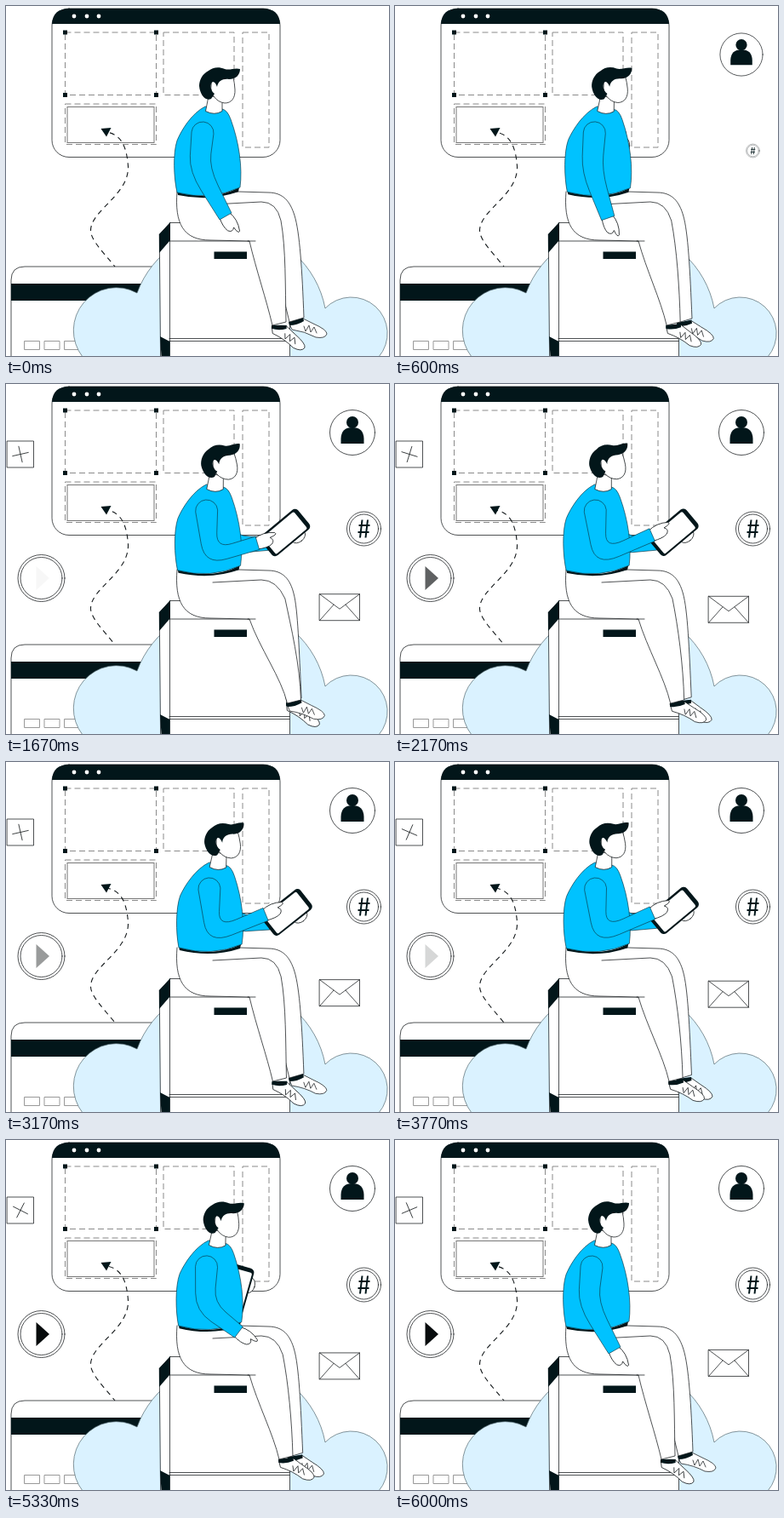
These frames come from a looping animation (450 by 411 pixels, 6030 ms). An HTML page:

```html
<!DOCTYPE html>
<html lang="en">
<head>
<meta charset="utf-8">
<title>Person with tablet</title>
<style>
  html, body { margin: 0; width: 100%; height: 100%; overflow: hidden; background: #fff; }
  svg { display: block; width: 100%; height: 100%; }
  .line { fill: #fff; stroke: #14191b; stroke-width: .75; stroke-linejoin: round; stroke-linecap: round; }
  .bare { fill: none; }
  .ink { fill: #02161a; }
  .blue { fill: #00c2ff; stroke: #0b3340; stroke-width: .65; stroke-linejoin: round; }
  .dash { fill: none; stroke: #8a8a8a; stroke-width: 1; stroke-dasharray: 7 4; }
</style>
</head>
<body>
<svg viewBox="0 0 450 411">
  <defs>
    <g id="shoe">
      <path class="line" d="M0 2L3 9Q18 11 31 18Q42 20 44 14Q44 9 28 2L16 -4Z"/>
      <path class="line bare" d="M17 5l2 6 4-7 2 8 4-6 3 7"/>
      <path class="ink" d="M-1 0L16 -5L17 -1Q9 4 0 4Z"/>
    </g>
  </defs>

  <g id="window">
    <rect class="line" x="54" y="3" width="268" height="174.5" rx="20"/>
    <path class="ink" d="M54 21Q55 3 74 3H302Q321 3 322 21Z"/>
    <g fill="#fff"><circle cx="80" cy="12" r="2.4"/><circle cx="95" cy="12" r="2.4"/><circle cx="109" cy="12" r="2.4"/></g>
    <rect class="dash" x="69.5" y="31" width="107" height="73.5"/>
    <rect class="dash" x="185" y="31" width="83" height="73.5"/>
    <rect class="dash" x="278" y="31" width="31" height="135"/>
    <rect class="dash" x="69.5" y="115" width="107" height="47.5"/>
    <rect x="72" y="118.5" width="102" height="42" fill="#fff" stroke="#777"/>
    <path class="ink" d="M67 28.500h5v5h-5zM174 28.500h5v5h-5zM67 102h5v5h-5zM174 102h5v5h-5z"/>
  </g>

  <g id="card">
    <path class="line" d="M6 415V322Q6 306 22 306H190V415Z"/>
    <path class="ink" d="M6 326H160V346H6Z"/>
    <path fill="none" stroke="#999" d="M21.500 393.500h18v10h-18zM45 393.500h18v10h-18zM68.500 393.500h18v10h-18z"/>
  </g>

  <path id="trail" fill="none" stroke="#14191b" stroke-width="1.100" stroke-dasharray="6 5"
    d="M118 148C138 151 142 170 143.500 188C145 222 99 240 99.500 264C100 275 114 289 128 306"/>
  <path class="ink" d="M111.500 144L123.500 143L118 153.500Z"/>

  <path d="M90 412A50.300 50.300 0 0 1 154 337A115 115 0 0 1 375 355A42.500 42.500 0 0 1 438 412Z"
    fill="#daf2ff" stroke="#53676f" stroke-width=".7"/>

  <g id="box">
    <path class="line" d="M180.500 268L193 254.500H333.500V415H182Z"/>
    <path class="line bare" d="M192 276H333.500M192.500 254.500V411M192 390.500H333M192 393.500H333"/>
    <path class="ink" d="M180 268L193 254V275L180 290ZM181 388L192.500 394V411H182.500Z"/>
    <path class="ink" d="M244.500 288.500H283V297H244.500Z"/>
  </g>

  <g id="user">
    <circle class="line" r="26.500"/>
    <circle class="ink" cy="-12" r="7"/>
    <path class="ink" d="M-13.500 13V7Q-13 -6 0 -6Q13 -6 13.500 7V13Z"/>
  </g>
  <g id="hash">
    <circle class="line" r="20"/><circle class="line" r="17"/>
    <path d="M-2 -10.500L-4.500 10.500M4.500 -10.500L2 10.500M-6 -4H7M-7 4H6" fill="none" stroke="#02161a" stroke-width="2"/>
  </g>
  <g id="close">
    <rect class="line" x="-15.500" y="-15.500" width="31" height="31"/>
    <path id="cross" class="line bare" d="M-9.500 0H9.500M0 -9.500V9.500"/>
  </g>
  <g id="play">
    <circle class="line" r="27.500"/><circle class="line" r="24.500"/>
    <path id="triangle" fill="#070b0c" d="M-6 -14L9.500 0L-6 14Z"/>
  </g>
  <g id="mail">
    <rect class="line" x="-23.500" y="-15.500" width="47" height="31"/>
    <path class="line bare" d="M-23.500 -15.500L0 2L23.500 -15.500M-23.500 15.500L-7 -3M23.500 15.500L7 -3"/>
  </g>

  <g id="behind">
    <path id="farSleeve" class="blue"/>
    <g id="tablet">
      <ellipse class="line" cx="14" cy="-9" rx="6" ry="9"/>
      <rect class="ink" x="-15" y="-28.500" width="30" height="57" rx="5"/>
      <rect x="-12.500" y="-23.500" width="25.500" height="48" rx="2" fill="#fff"/>
    </g>
  </g>

  <g id="legs">
    <use id="farShoe" href="#shoe"/>
    <path id="farLeg" class="line"/>
    <use id="nearShoe" href="#shoe"/>
    <path id="nearLeg" class="line"/>
    <path class="line bare" d="M284 276H293"/>
  </g>

  <g id="body">
    <path class="ink" d="M201 217Q240 231 274 213L273 218Q240 230 202 222Z"/>
    <path class="blue" d="M234 118C218 126 206 146 201 158C196 173 197 201 201 219Q240 229 275 213C278 190 274 160 264 133Q260 122 254 121Z"/>
    <path class="line" d="M238 106L234.500 123.500Q245 129 254 123.500V108Z"/>
    <g id="head">
      <path class="line" d="M243 84L267 84Q268.500 90 269 98C269.500 108 265 114 257 114Q249 113 244 106Q238 98 243 84Z"/>
      <path class="ink" d="M275 74C269 72 263 76 257 74C250 71 243 72 238 76C230 80 227 88 227 94C228 104 234 112 241 109L245 103C240 100 239 91 243 89Q246 89 248 95C249 88 255 85 262 86C270 86 275 81 275 74Z"/>
    </g>
    <path id="hand" class="line" d="M-2 -6Q10 -11 23 -6Q26 -3 16 -2Q21 2 16 6Q10 9 -2 7Z"/>
    <path id="nearSleeve" class="blue"/>
  </g>
</svg>
<script>
const LOOP = 6030;
const el = Object.fromEntries([...document.querySelectorAll('[id]')].map(n => [n.id, n]));
const set = (name, key, value) => el[name].setAttribute(key, value);
const place = (name, x, y, turn = 0, scale = 1) =>
  set(name, 'transform', `translate(${x} ${y}) rotate(${turn}) scale(${scale})`);
const smooth = p => p * p * (3 - 2 * p);
const ramp = (t, from, to) => smooth(Math.min(1, Math.max(0, (t - from) / (to - from))));
const wave = (t, period) => (1 - Math.cos(2 * Math.PI * t / period)) / 2;
const mix = (a, b, p) => a.map((v, i) => v + (b[i] - v) * p);

// Rows are [time, ...values]; values ease from row to row.
function track(rows, t) {
  const next = rows.findIndex(r => r[0] > t);
  if (next < 0) return rows.at(-1).slice(1);
  if (next === 0) return rows[0].slice(1);
  const a = rows[next - 1], b = rows[next];
  return mix(a, b, ramp(t, a[0], b[0])).slice(1);
}

const armDown = [231, 149, 227, 192, 258, 247];
const armUp = [235, 149, 241, 204, 302, 177];
const armTrack = [
  [0, ...armDown], [1050, 232, 149, 231, 195, 244, 250], [1850, ...armUp],
  [4800, ...armUp], [5650, ...armDown]
];
const tabletTrack = [
  [450, 243, 175, 0], [1130, 321, 147, 21], [1700, 327, 174, 50],
  [4850, 327, 174, 50], [5600, 243, 175, 0]
];
const headTrack = [[0, 0], [1130, -6], [2170, -8], [3170, -6], [3770, -5], [4670, -2], [6000, 0]];

function unit([x, y]) {
  const l = Math.hypot(x, y) || 1;
  return [x / l, y / l];
}
const normal = (a, b) => unit([a[1] - b[1], b[0] - a[0]]);

function sleeve(shoulder, elbow, wrist) {
  const u = normal(shoulder, elbow), v = normal(elbow, wrist);
  const m = unit([u[0] + v[0], u[1] + v[1]]);
  const shift = (p, n, w) => [p[0] + n[0] * w, p[1] + n[1] * w];
  const side = k => [shift(shoulder, u, 13 * k), shift(elbow, m, 12 * k), shift(wrist, v, 8 * k)];
  const [a, b, c] = side(1), [d, e, f] = side(-1);
  return `M${a}L${mix(a, b, .6)}Q${b} ${mix(b, c, .4)}L${c}L${f}L${mix(e, f, .4)}Q${e} ${mix(d, e, .6)}L${d}A13 13 0 0 0 ${a}Z`;
}

function drawLegs(t) {
  const k = wave(t, LOOP / 2);
  const near = 313 + 18 * k, far = 333 - 3 * k, farY = 371 + 3 * k;
  set('nearLeg', 'd', `M201 218C198 255 208 275 240 275L286 276C${294 + 4 * k} 310 ${near - 7} 345 ${near} 375
    L${near + 16} 371C${near + 15} 330 ${329 + 6 * k} 285 ${323 + 5 * k} 252Q318 230 300 230L243 233`);
  set('farLeg', 'd', `M240 224L273 218L308 219C326 219 334 230 ${339 - k} 246C${345 - 2 * k} 265 ${348 - 4 * k} 310 ${far + 17} ${farY - 5}
    L${far} ${farY}L310 276`);
  place('nearShoe', near, 375, 17 * (1 - k));
  place('farShoe', far, farY, 17 * k);
}

function drawBody(t) {
  const s = wave(t, LOOP / 3);
  const sway = `translate(${2 * s} 0) rotate(${1.7 * s} 238 222)`;
  set('body', 'transform', sway);
  set('behind', 'transform', sway);
  set('head', 'transform', `rotate(${track(headTrack, t)[0]} 242 88)`);

  const [sx, sy, ex, ey, wx, wy] = track(armTrack, t);
  set('nearSleeve', 'd', sleeve([sx, sy], [ex, ey], [wx, wy]));
  place('hand', wx, wy, Math.atan2(wy - ey, wx - ex) * 180 / Math.PI);

  const [x, y, turn] = track(tabletTrack, t);
  set('behind', 'display', t > 450 && t < 5600 ? 'inline' : 'none');
  set('farSleeve', 'd', sleeve([250, 160], [265, 189], [x - 20, y + 13]));
  place('tablet', x, y, turn);
}

function drawIcons(t) {
  place('user', 407, 57, 0, ramp(t, 300, 650));
  place('hash', 420.5, 170, 0, ramp(t, 450, 800));
  place('close', 17, 82.5, 0, ramp(t, 650, 1000));
  place('cross', 0, 0, .06 * t - 23);
  const late = ramp(t, 830, 1300);
  place('play', 41.5, 228, 0, late);
  set('triangle', 'opacity', 1 - wave(t - 4670, 658));
  place('mail', 392, 267 + 5.7 * Math.cos(2 * Math.PI * (t - 3800) / 5200), 0, late);
}

function draw(t) {
  set('trail', 'stroke-dashoffset', -4 - 11 * t / LOOP);
  drawIcons(t);
  drawLegs(t);
  drawBody(t);
}

const start = performance.now();
function tick() {
  draw((performance.now() - start) % LOOP);
  requestAnimationFrame(tick);
}
tick();
</script>
</body>
</html>
```
